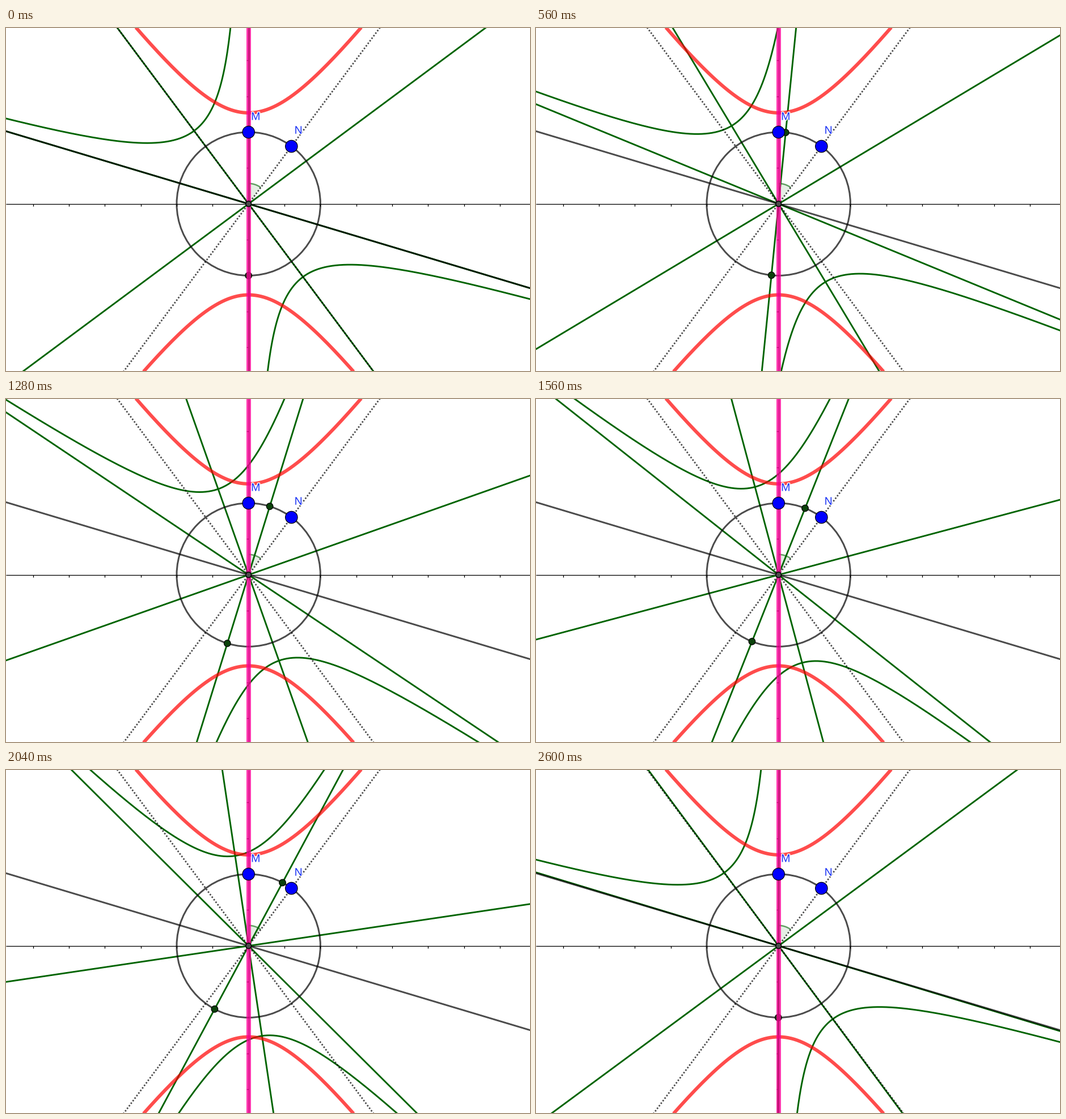
A matplotlib script that plays this animation: 924x606 px, repeating every 2720 ms.

```python
import matplotlib.pyplot as plt
import matplotlib.patheffects as pe
import numpy as np
from matplotlib.animation import FuncAnimation
from matplotlib.patches import Circle, Wedge

W, H, DPI = 924, 606, 100
PT = 72 / DPI                       # points per pixel
CX, CY = 427.7, 310.7               # origin
UNIT = 63.35
R = 2 * UNIT
ALPHA = 36.65                       # angle between M and N, degrees
A = 160.8                           # vertex distance of the hyperbolas
B = A * np.tan(np.radians(ALPHA))
REACH = 1200

GREEN = (0, 100 / 255, 0)
BLUE = (0, 0, 1)
TICK_MS, TICKS = 40, 68

# The angle advances on an uneven beat of 80 and 120 ms.
starts = [0] + [4 + 14 * g + k for g in range(5) for k in (0, 3, 5, 7, 10, 12)]
starts = np.array([s for s in starts if s < TICKS - 1])
KEY_STEP = (0, 1, 5, 10, 13, 16, 21, 26, 27)
KEY_ANGLE = (0, 0.3, 5.68, 13.15, 17.18, 21.68, 28.18, 35.3, 0.18)

fig = plt.figure(figsize=(W / DPI, H / DPI), dpi=DPI, facecolor="white")
ax = fig.add_axes([0, 0, 1, 1])
ax.set_xlim(0, W)
ax.set_ylim(H, 0)
ax.axis("off")


def rotate(x, y, deg):
    """Turn clockwise from straight up and move to the origin on stage."""
    c, s = np.cos(np.radians(deg)), np.sin(np.radians(deg))
    return CX + x * c - y * s, CY + x * s + y * c


def spoke(deg):
    return rotate(np.zeros(2), np.array([-REACH, REACH]), deg)


def hyperbola(deg):
    t = np.linspace(-2.6, 2.6, 240)
    x, y = B * np.sinh(t), A * np.cosh(t)
    gap = [np.nan]
    return rotate(np.concatenate([x, gap, x]), np.concatenate([-y, gap, y]), deg)


def stroke(xy, color, width, z, **kw):
    line, = ax.plot(*xy, color=color, lw=width * PT, zorder=z,
                    solid_capstyle="butt", dash_capstyle="butt", **kw)
    return line


def dot(xy, radius, fill, z, edge=1.2):
    return ax.add_patch(Circle(xy, radius, fc=fill, ec="black",
                               lw=edge * PT, zorder=z))


def label(x, y, text):
    ax.text(x, y, text, color="#1a33f5", fontsize=19.5 * PT, ha="center",
            va="center_baseline", family="Liberation Sans", zorder=12,
            path_effects=[pe.withStroke(linewidth=3 * PT, foreground="white")])


# coordinate axes
stroke(([0, W], [CY, CY]), "black", 1.3, 1)
stroke(([CX, CX], [0, H]), "black", 1.3, 1)
for k in range(-6, 8):
    if k:
        x = CX + k * UNIT
        stroke(([x, x], [CY, CY + 4]), "black", 1.3, 1)
for k in range(-4, 5):
    if k:
        y = CY + k * UNIT
        stroke(([CX - 4, CX], [y, y]), "black", 1.3, 1)

# angle mark
ax.add_patch(Wedge((CX, CY), 36, -90, -90 + ALPHA, fc=GREEN, ec="none",
                   alpha=0.1, zorder=2))
arc = np.radians(np.linspace(0, ALPHA, 30))
stroke((CX + 36 * np.sin(arc), CY - 36 * np.cos(arc)), GREEN, 2.5, 2, alpha=0.6)

# fixed circle, lines and curve
ax.add_patch(Circle((CX, CY), R, fill=False, ec="black", alpha=0.7,
                    lw=3 * PT, zorder=4))
stroke(spoke(-2 * ALPHA), "black", 3, 4, alpha=0.7)
for side in (-ALPHA, ALPHA):
    stroke(spoke(side), "black", 2.8, 4, alpha=0.7, linestyle=(0, (0.95, 1.05)))
stroke(hyperbola(0), "red", 6, 5, alpha=0.7)
stroke(spoke(0), "#ff0099", 8, 7, alpha=0.78)

# turning parts
offsets = (0, -ALPHA, -2 * ALPHA, 90 - ALPHA)
spokes = [stroke(spoke(d), GREEN, 2.9, 3) for d in offsets]
curve = stroke(hyperbola(-ALPHA), GREEN, 2.9, 3)
ends = [dot((CX, CY), 5.8, "#0b420b", 6) for _ in range(2)]

# named points
dot((CX, CY), 4.8, "#4d4d4d", 10, 1.5)
dot((CX, CY - R), 10.7, BLUE, 11)
dot(rotate(0, -R, ALPHA), 10.7, BLUE, 11)
label(440.3, 156, "M")
label(515.7, 180.3, "N")


def draw(i):
    step = np.searchsorted(starts, i, side="right") - 1
    theta = np.interp(step, KEY_STEP, KEY_ANGLE)
    for line, d in zip(spokes, offsets):
        line.set_data(*spoke(theta + d))
    curve.set_data(*hyperbola(theta - ALPHA))
    for end, sign in zip(ends, (-1, 1)):
        end.center = rotate(0, sign * R, theta)
    return [*spokes, curve, *ends]


anim = FuncAnimation(fig, draw, frames=TICKS, interval=TICK_MS,
                     repeat=True, repeat_delay=0, blit=False)
plt.show()
```
